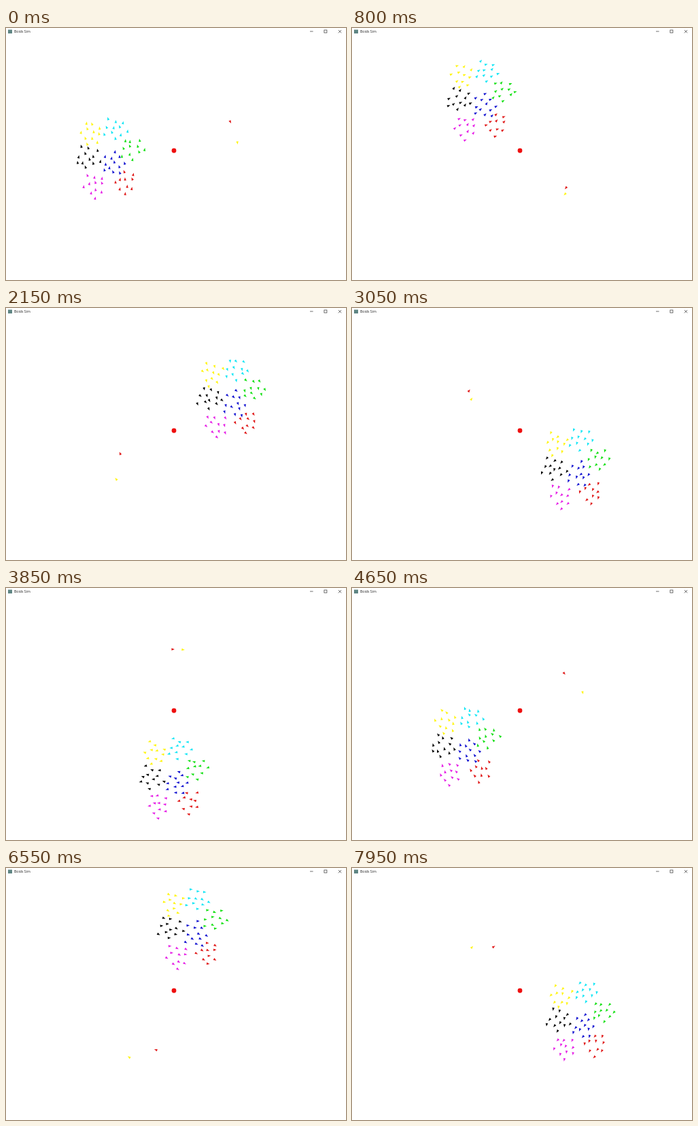
Animation of 500x370 px, one loop 8000 ms. Source, as an HTML page with a canvas:

```html
<!DOCTYPE html>
<html lang="en">
<head>
<meta charset="utf-8">
<title>Boids Sim</title>
<style>
  html, body { margin: 0; width: 100%; height: 100%; overflow: hidden; background: #fff; }
  canvas, svg { position: absolute; left: 0; top: 0; width: 500px; height: 370px; }
  text { font: 5.2px "Open Sans", "Noto Sans", sans-serif; fill: #222; }
</style>
</head>
<body>
<canvas id="stage" width="500" height="370"></canvas>
<svg viewBox="0 0 500 370">
  <rect x="3" y="2.5" width="6" height="5.5" fill="#5f8583"/>
  <text x="12" y="7.2">Boids Sim</text>
  <g fill="none" stroke="#333" stroke-width=".7">
    <path d="M447 5h4.6M488.8 3l4.3 4.3M493.1 3l-4.3 4.3"/>
    <rect x="467.9" y="3" width="4" height="4"/>
  </g>
</svg>
<script>
const LOOP = 8000, STEP = 50, TURN = 2 * Math.PI, DEGREE = TURN / 360;
const HUB = { x: 247, y: 180 };
const GOLDEN_ANGLE = Math.PI * (3 - Math.sqrt(5));
const FLOCK = { start: 175, speed: 0.0718, radius: 96.5 };
const RED = "#e01818", YELLOW = "#fff514";
const ctx = document.getElementById("stage").getContext("2d");

// Team centres relative to the middle of the flock.
const teams = [
  { color: YELLOW, x: -26, y: -33, size: 11 },
  { color: "#14e6f5", x: 10, y: -41, size: 11 },
  { color: "#14e014", x: 35, y: -12, size: 11 },
  { color: "#000", x: -30, y: 1, size: 12 },
  { color: "#1010d0", x: 6, y: 10, size: 12 },
  { color: "#e61ee6", x: -20, y: 43, size: 11 },
  { color: RED, x: 24, y: 37, size: 10 }
];

// Two stragglers circle unevenly: angles in degrees and radii at these times.
const TIMES = [0, 800, 2150, 3050, 4650, 6550, 7950];
const loners = [
  { color: RED, angles: [-27, 39, 157, 218, 320, 467, 599], radii: [93, 87, 86, 95, 85, 91, 75] },
  { color: YELLOW, angles: [-7, 44, 140, 213, 344, 484, 582], radii: [94, 92, 111, 85, 96, 118, 95] }
];

function randomFrom(seed) {
  return () => (seed = seed * 16807 % 2147483647) / 2147483647;
}

// Each team fills a disc evenly, as seeds do in a sunflower.
const random = randomFrom(41);
const boids = teams.flatMap(({ color, x, y, size }) =>
  Array.from({ length: size }, (_, i) => {
    const r = 5.6 * Math.sqrt(i + 0.5), angle = i * GOLDEN_ANGLE + x;
    return {
      color,
      x: x + r * Math.cos(angle),
      y: y + r * Math.sin(angle),
      phase: random() * TURN,
      pace: 0.6 + random() * 0.8
    };
  }));

function interpolate(values, t) {
  let i = 0;
  while (i < TIMES.length - 2 && t >= TIMES[i + 1]) i++;
  const k = (t - TIMES[i]) / (TIMES[i + 1] - TIMES[i]);
  return values[i] + (values[i + 1] - values[i]) * k;
}

function onOrbit(degrees, radius) {
  const angle = degrees * DEGREE;
  return {
    x: HUB.x + radius * Math.cos(angle),
    y: HUB.y + radius * Math.sin(angle),
    heading: angle + TURN / 4
  };
}

function drawBoid(x, y, heading, color) {
  ctx.save();
  ctx.translate(x, y);
  ctx.rotate(heading);
  ctx.fillStyle = color;
  ctx.beginPath();
  ctx.moveTo(2.6, 0);
  ctx.lineTo(-2, 1.75);
  ctx.lineTo(-2, -1.75);
  ctx.fill();
  ctx.restore();
}

function render(t) {
  ctx.clearRect(0, 0, 500, 370);

  const flock = onOrbit(FLOCK.start + FLOCK.speed * t, FLOCK.radius);
  for (const { color, x, y, phase, pace } of boids) {
    const sway = phase + pace * t / 700;
    drawBoid(
      flock.x + x + 1.5 * Math.cos(sway),
      flock.y + y + 1.5 * Math.sin(sway),
      flock.heading + 0.35 * Math.sin(sway),
      color
    );
  }

  for (const { color, angles, radii } of loners) {
    const { x, y, heading } = onOrbit(interpolate(angles, t), interpolate(radii, t));
    drawBoid(x, y, heading, color);
  }

  ctx.fillStyle = "#ee1010";
  ctx.beginPath();
  ctx.arc(HUB.x, HUB.y, 3.4, 0, TURN);
  ctx.fill();
}

const begin = performance.now();
function tick() {
  const t = (performance.now() - begin) % LOOP;
  render(Math.floor(t / STEP) * STEP);
  requestAnimationFrame(tick);
}
tick();
</script>
</body>
</html>
```
